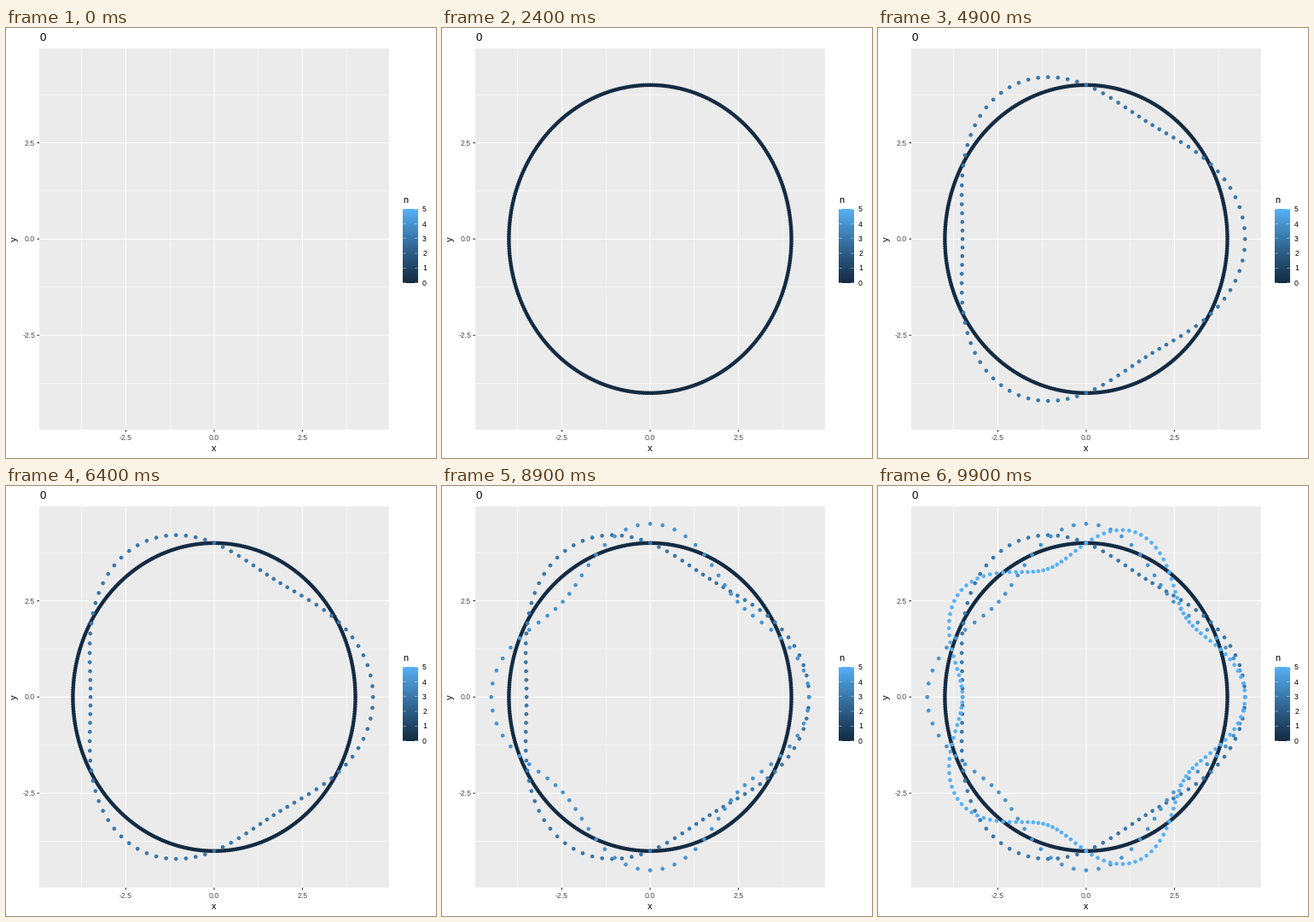
Write a matplotlib script that moves like this. It is 504 px wide and 504 px high and loops after 10 s.

```python
import numpy as np
import matplotlib.pyplot as plt
from matplotlib.animation import FuncAnimation
from matplotlib.collections import PatchCollection
from matplotlib.patches import Circle, Rectangle

SIZE = 504
LEFT, RIGHT, TOP, BOTTOM = 39.1, 448.83, 24.0, 470.7
LIMIT = 4.95
FRAME_MS, FRAMES = 100, 100
# (waves, number of points, time of appearance in ms)
SERIES = [(0, 400, 2400), (3, 100, 4900), (4, 80, 7400), (5, 160, 9900)]
POINT_RADIUS = 2.31

WHITE_POINT = np.array([0.95047, 1.0, 1.08883])
RGB_TO_XYZ = np.array([[0.4124564, 0.3575761, 0.1804375],
                       [0.2126729, 0.7151522, 0.0721750],
                       [0.0193339, 0.1191920, 0.9503041]])
XYZ_TO_LAB = np.array([[0, 116, 0], [500, -500, 0], [0, 200, -200]])

plt.rcParams["font.family"] = "Liberation Sans"


def rgb_to_lab(rgb):
    rgb = np.asarray(rgb) / 255
    linear = np.where(rgb > 0.04045, ((rgb + 0.055) / 1.055) ** 2.4, rgb / 12.92)
    t = RGB_TO_XYZ @ linear / WHITE_POINT
    f = np.where(t > 0.008856, np.cbrt(t), 7.787 * t + 16 / 116)
    return XYZ_TO_LAB @ f - [16, 0, 0]


def lab_to_rgb(lab):
    f = np.linalg.solve(XYZ_TO_LAB, lab + [16, 0, 0])
    t = np.where(f > 0.2069, f ** 3, (f - 16 / 116) / 7.787)
    linear = np.clip(np.linalg.solve(RGB_TO_XYZ, t * WHITE_POINT), 0, 1)
    return np.where(linear > 0.0031308,
                    1.055 * linear ** (1 / 2.4) - 0.055, 12.92 * linear)


DARK, LIGHT = rgb_to_lab([0x13, 0x2B, 0x43]), rgb_to_lab([0x56, 0xB1, 0xF7])


def shade(n):
    return np.clip(lab_to_rgb(DARK + (LIGHT - DARK) * n / 5), 0, 1)


def px(x):
    return LEFT + (x + LIMIT) / (2 * LIMIT) * (RIGHT - LEFT)


def py(y):
    return BOTTOM - (y + LIMIT) / (2 * LIMIT) * (BOTTOM - TOP)


fig = plt.figure(figsize=(SIZE / 72, SIZE / 72), dpi=72, facecolor="white")
ax = fig.add_axes([0, 0, 1, 1])
ax.axis("off")


def line(xs, ys, color, width, z=1):
    ax.plot(xs, ys, color=color, lw=width, solid_capstyle="butt",
            snap=False, zorder=z)


def label(x, y, text, size, color="black", ha="left", **kwargs):
    ax.text(x, y, text, fontsize=size, color=color, ha=ha, va="baseline",
            **kwargs)


def draw_panel():
    ax.add_patch(Rectangle((LEFT, TOP), RIGHT - LEFT, BOTTOM - TOP,
                           fc="#EBEBEB", lw=0, snap=False, zorder=0))
    for value in (-3.75, -1.25, 1.25, 3.75):
        line([px(value)] * 2, [TOP, BOTTOM], "white", 0.53)
        line([LEFT, RIGHT], [py(value)] * 2, "white", 0.53)
    for value in (-2.5, 0, 2.5):
        x, y = px(value), py(value)
        line([x, x], [TOP, BOTTOM], "white", 1.07, 2)
        line([LEFT, RIGHT], [y, y], "white", 1.07, 2)
        line([x, x], [BOTTOM, BOTTOM + 2.75], "#333333", 1.07)
        line([LEFT - 2.75, LEFT], [y, y], "#333333", 1.07)
        label(x, 483, f"{value:.1f}", 8.8, "#4D4D4D", "center")
        label(LEFT - 4.95, y + 3.15, f"{value:.1f}", 8.8, "#4D4D4D", "right")
    label(px(0), 496, "x", 11, ha="center")
    label(13, py(0), "y", 11, ha="center", rotation=90, rotation_mode="anchor")
    label(LEFT, 15, "0", 13.2)


def draw_legend():
    left, right, top, bottom = 465.33, 482.61, 212.2, 298.6
    ramp = np.array([[shade(n)] for n in np.linspace(5, 0, 300)])
    ax.imshow(ramp, extent=(left, right, bottom, top), aspect="auto",
              interpolation="bilinear", zorder=1)
    label(left, 205, "n", 11)
    for n in range(6):
        y = bottom + (top - bottom) * n / 5
        line([left, left + 3.46], [y, y], "white", 0.4, 2)
        line([right - 3.46, right], [y, y], "white", 0.4, 2)
        label(right + 5.5, y + 3.15, str(n), 8.8)


def draw_series(n, count, z):
    theta = np.arange(count) * 2 * np.pi / count
    r = 4 + (0.5 * np.cos(n * theta) if n else 0 * theta)
    dots = [Circle(p, POINT_RADIUS)
            for p in zip(px(r * np.cos(theta)), py(r * np.sin(theta)))]
    group = PatchCollection(dots, facecolor=shade(n), linewidth=0, zorder=z)
    group.set_snap(False)
    return ax.add_collection(group)


draw_panel()
draw_legend()
groups = [draw_series(n, count, 3 + i)
          for i, (n, count, _) in enumerate(SERIES)]
ax.set_xlim(0, SIZE)
ax.set_ylim(SIZE, 0)


def update(frame):
    for group, (_, _, start) in zip(groups, SERIES):
        group.set_visible(frame * FRAME_MS >= start)
    return groups


anim = FuncAnimation(fig, update, frames=FRAMES, interval=FRAME_MS,
                     init_func=lambda: update(0), repeat=True, repeat_delay=0)
plt.show()
```
